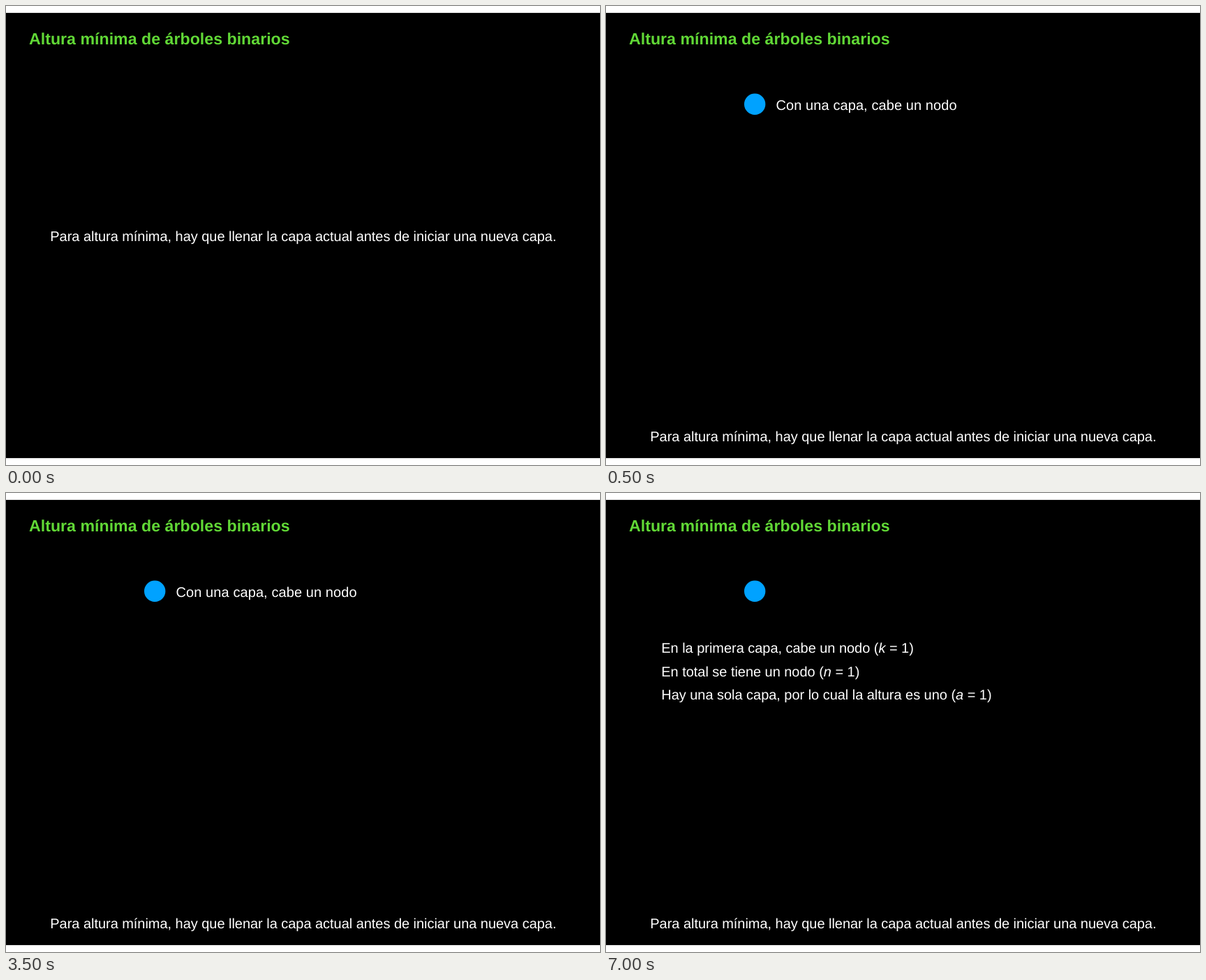
These frames come from a looping animation (851x658 px, 8000 ms). An HTML page:

```html
<!DOCTYPE html>
<html lang="es">
<head>
<meta charset="utf-8">
<title>Altura mínima de árboles binarios</title>
<style>
  html, body { margin: 0; width: 100%; height: 100%; overflow: hidden; background: #fff; }
  svg { display: block; width: 851px; height: 658px; }
  text {
    font: 20px "Liberation Sans", Arial, sans-serif; letter-spacing: -.038px;
    fill: #fff; text-rendering: geometricPrecision;
  }
  .title { font-size: 23.2px; font-weight: bold; letter-spacing: 0; fill: #61d836; }
  .var { font-style: italic; }
  #caption { letter-spacing: .09px; }
</style>
</head>
<body>
<svg viewBox="0 0 851 658">
  <rect y="9.875" width="851" height="638.25"/>
  <text class="title" x="33" y="55">Altura mínima de árboles binarios</text>
  <circle id="node" cx="213.2" cy="140.7" r="15.2" fill="#00a2ff"/>
  <text id="caption" x="243.5" y="148.8">Con una capa, cabe un nodo</text>
  <g id="facts">
    <text x="79.3" y="229.3">En la primera capa, cabe un nodo (<tspan class="var">k</tspan> = 1)</text>
    <text x="79.3" y="262.6">En total se tiene un nodo (<tspan class="var">n</tspan> = 1)</text>
    <text x="79.3" y="295.9">Hay una sola capa, por lo cual la altura es uno (<tspan class="var">a</tspan> = 1)</text>
  </g>
  <text id="rule" x="63.3">Para altura mínima, hay que llenar la capa actual antes de iniciar una nueva capa.</text>
</svg>
<script>
  const LOOP = 8000, NODE_AT = 500, FACTS_AT = 5500;
  const get = id => document.getElementById(id);
  const node = get('node'), caption = get('caption'), facts = get('facts'), rule = get('rule');
  const show = (el, on) => el.setAttribute('visibility', on ? 'visible' : 'hidden');

  function draw(t) {
    const started = t >= NODE_AT, explained = t >= FACTS_AT;
    show(node, started);
    show(caption, started && !explained);
    show(facts, explained);
    rule.setAttribute('y', started ? 624.3 : 336.8);
  }

  let start;
  function tick(now) {
    start ??= now;
    draw((now - start) % LOOP);
    requestAnimationFrame(tick);
  }
  draw(0);
  requestAnimationFrame(tick);
</script>
</body>
</html>
```
